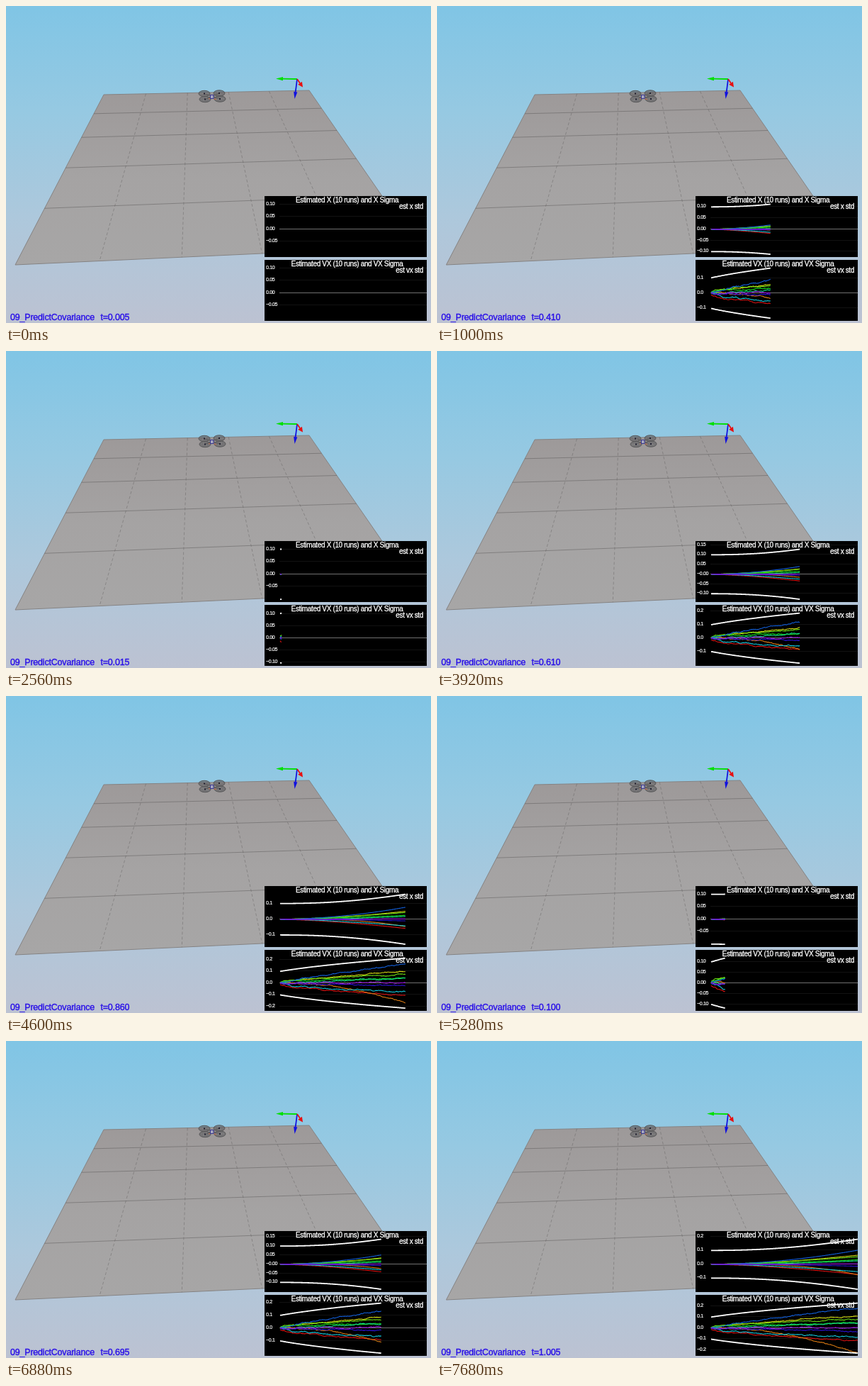
Animation of 600x447 px, one loop 7720 ms. Source, as an HTML page with a canvas:

```html
<!DOCTYPE html>
<html lang="en">
<head>
<meta charset="utf-8">
<title>Predict covariance</title>
<style>
html, body { margin: 0; width: 100%; height: 100%; overflow: hidden; }
canvas { display: block; }
</style>
</head>
<body>
<canvas id="stage" width="600" height="447"></canvas>
<script>
const ctx = document.getElementById('stage').getContext('2d');
const LOOP = 7720, STEP = 40, DT = 0.005;

// Simulation clock: three runs as [tick, seconds] key points.
const CLOCK = [
  [[0, .005], [47, .77], [63, 1.005]],
  [[64, .015], [98, .61], [125, 1.005]],
  [[126, .01], [172, .695], [192, 1.005]]
];

// Each run drifts as end * t^power, plus noise.
const DRIFTS = [
  [-.11, .5], [-.225, 2], [.11, .7], [.08, .5], [.045, .4],
  [.05, .9], [-.085, .6], [.18, .85], [-.03, 1.2], [.003, 1]
];

// Floor corners with their perspective weights: far left, far right, near right, near left.
const FLOOR = [[138, 125, .6515], [428, 119, .6724], [580, 339, .3485], [13, 365, .3276]];
const CELLS = 5;

function interpolate(points, x) {
  let i = 1;
  while (i < points.length - 1 && points[i][0] < x) i++;
  const [x0, y0] = points[i - 1], [x1, y1] = points[i];
  return y0 + (y1 - y0) * (x - x0) / (x1 - x0);
}

let seed = 9;
const random = () => (seed = seed * 16807 % 2147483647) / 2147483647;

const traces = DRIFTS.map(([end, power], run) => {
  const vel = [0], pos = [0];
  let noise = 0;
  for (let i = 1; i <= 201; i++) {
    noise = noise * .9 + (random() - .5) * .006;
    vel[i] = end * (i * DT) ** power + noise;
    pos[i] = pos[i - 1] + vel[i] * DT;
  }
  return { color: `hsl(${run * 31}, 85%, 46%)`, vel, pos };
});

const sigmaX = t => Math.sqrt(.01 + .01 * t * t + .0125 * t ** 3);
const sigmaV = t => Math.sqrt(.01 + .042 * t);

function path(points, color, width = 1) {
  ctx.beginPath();
  points.forEach(([x, y]) => ctx.lineTo(x, y));
  ctx.strokeStyle = color;
  ctx.lineWidth = width;
  ctx.stroke();
}

function polygon(points, color) {
  ctx.beginPath();
  points.forEach(([x, y]) => ctx.lineTo(x, y));
  ctx.fillStyle = color;
  ctx.fill();
}

function verticalGradient(y0, y1, colors) {
  const gradient = ctx.createLinearGradient(0, y0, 0, y1);
  colors.forEach((c, i) => gradient.addColorStop(i / (colors.length - 1), c));
  return gradient;
}

function text(str, x, y, size, spacing, color = '#fff', align = 'left') {
  ctx.font = size + 'px "Liberation Sans", Arial, sans-serif';
  ctx.letterSpacing = spacing + 'px';
  ctx.textAlign = align;
  ctx.fillStyle = ctx.strokeStyle = color;
  ctx.lineWidth = size * .03;
  ctx.fillText(str, x, y);
  ctx.strokeText(str, x, y);
}

function arrow(x0, y0, x1, y1, color, head, half) {
  const len = Math.hypot(x1 - x0, y1 - y0);
  const ux = (x1 - x0) / len, uy = (y1 - y0) / len;
  const bx = x1 - ux * head, by = y1 - uy * head;
  path([[x0, y0], [bx, by]], color, 1.8);
  polygon([[x1, y1], [bx - uy * half, by + ux * half], [bx + uy * half, by - ux * half]], color);
}

// Floor point at u (left to right) and v (far to near), in perspective.
function floorPoint(u, v) {
  const shares = [(1 - u) * (1 - v), u * (1 - v), u * v, (1 - u) * v];
  let x = 0, y = 0, sum = 0;
  FLOOR.forEach(([cx, cy, weight], i) => {
    const w = weight * shares[i];
    x += cx * w;
    y += cy * w;
    sum += w;
  });
  return [x / sum, y / sum];
}

function drawScene() {
  ctx.fillStyle = verticalGradient(0, 447, ['#80c5e5', '#96c9e2', '#adc8dc', '#bcc2d2']);
  ctx.fillRect(0, 0, 600, 447);

  polygon(FLOOR, verticalGradient(119, 365, ['#9d9999', '#a5a3a3', '#a7a6a6']));
  path([...FLOOR, FLOOR[0]], '#858383');
  for (let i = 1; i < CELLS; i++) {
    const s = i / CELLS;
    path([floorPoint(0, s), floorPoint(1, s)], 'rgba(90,88,88,.55)', .9);
    ctx.setLineDash([4, 3]);
    path([floorPoint(s, 0), floorPoint(s, 1)], 'rgba(90,88,88,.45)', .9);
    ctx.setLineDash([]);
  }

  arrow(411, 103, 381, 102.5, '#00e000', 10, 2.6);
  arrow(411, 103, 407.5, 131, '#1010e0', 10, 2.6);
  arrow(411, 103, 419, 114.5, '#e81010', 7, 3.5);
}

function drawDrone(tick) {
  const rotors = [[280, 123.5], [301, 123], [281, 131.5], [302, 131]];
  path([rotors[0], rotors[3]], '#505050', 1.3);
  path([rotors[1], rotors[2]], '#505050', 1.3);
  rotors.forEach(([x, y], i) => {
    ctx.beginPath();
    ctx.ellipse(x, y, 8, 4.2, 0, 0, 7);
    ctx.fillStyle = 'rgba(95,95,98,.65)';
    ctx.fill();
    ctx.strokeStyle = '#585859';
    ctx.lineWidth = 1;
    ctx.stroke();
    const a = tick * 1.9 + i, dx = 6 * Math.cos(a), dy = 3 * Math.sin(a);
    path([[x - dx, y - dy], [x + dx, y + dy]], '#8a8a8a', .8);
    ctx.fillStyle = '#202030';
    ctx.fillRect(x - 1, y - 1, 2, 2);
  });
  path([[286, 131], [290, 129.5]], '#c07050', 1.2);
  path([[293, 130.5], [297, 132]], '#c07050', 1.2);
  ctx.fillStyle = '#a8a8c0';
  ctx.fillRect(289, 126, 4, 4);
  ctx.strokeStyle = '#383890';
  ctx.lineWidth = 1;
  ctx.strokeRect(288.5, 125.5, 4.5, 5);
}

function drawPlot(top, zero, t, title, legend, sigma, key) {
  const max = sigma(t), scale = 35.3 / max;
  const step = max < .15 ? .05 : .1;
  const px = s => 386 + 206.8 * s, py = v => zero - v * scale;
  const count = Math.round(t / DT);
  const curve = value => Array.from({ length: count }, (_, i) => [px((i + 1) * DT), py(value(i + 1))]);

  ctx.save();
  ctx.beginPath();
  ctx.rect(365, top, 229, 86);
  ctx.clip();
  ctx.fillStyle = '#000';
  ctx.fillRect(365, top, 229, 86);

  for (let k = -2; k <= 3; k++) {
    const v = k * step;
    if (v > max * 1.2 || v < -max * .971) continue;
    const y = Math.round(py(v)) - .5;
    path([[386, y], [594, y]], k ? '#121212' : '#707070');
    const minus = k < 0 || (k === 0 && step === .05 && max > .125);
    const label = (minus ? '\u2212' : '') + Math.abs(v).toFixed(step < .1 ? 2 : 1);
    text(label, 367, py(v) + 1, 7, -.3);
  }

  for (const trace of traces) path(curve(i => trace[key][i]), trace.color, 1.1);
  for (const sign of [1, -1]) path(curve(i => sign * sigma(i * DT)), '#fff', 1.8);

  text(title, 481.5, top + 9, 10, -.35, '#fff', 'center');
  text(legend, 589, top + 18, 10, -.35, '#fff', 'right');
  ctx.restore();
}

function draw(now) {
  const tick = Math.floor(now % LOOP / STEP);
  const run = CLOCK.findLast(points => points[0][0] <= tick);
  const t = Math.round(interpolate(run, tick) / DT) * DT;

  drawScene();
  drawDrone(tick);
  drawPlot(268, 314.8, t, 'Estimated X (10 runs) and X Sigma', 'est x std', sigmaX, 'pos');
  drawPlot(358, 404.9, t, 'Estimated VX (10 runs) and VX Sigma', 'est vx std', sigmaV, 'vel');
  text('09_PredictCovariance', 6, 443, 12.5, -.2, '#2a10e8');
  text('t=' + t.toFixed(3), 133.5, 443, 12.5, -.2, '#2a10e8');
}

const start = performance.now();
function loop() {
  draw(performance.now() - start);
  requestAnimationFrame(loop);
}
loop();
</script>
</body>
</html>
```
